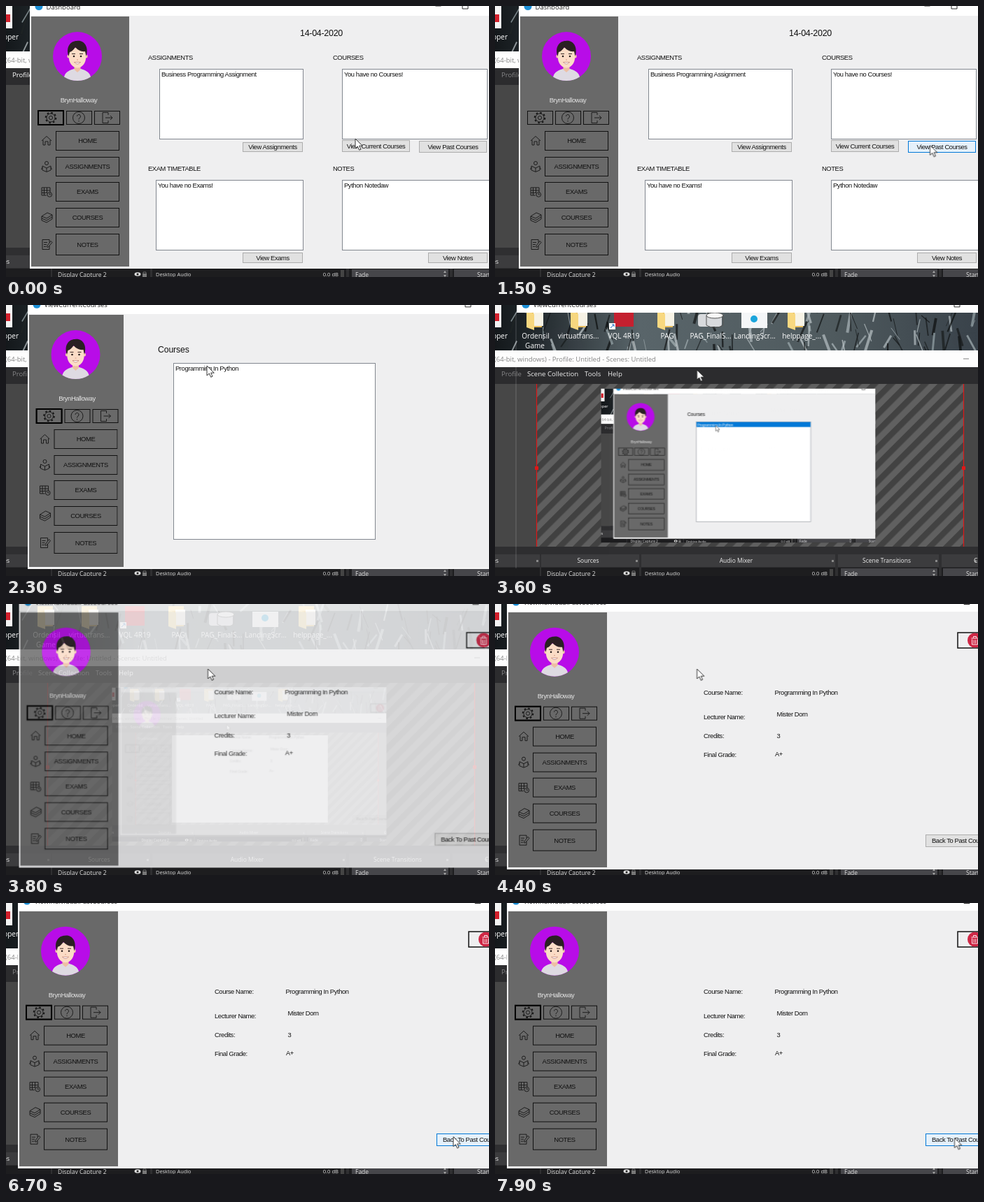
These frames come from a looping animation (690 by 388 pixels, 8000 ms). An HTML page:

```html
<!DOCTYPE html>
<html lang="en">
<head>
<meta charset="utf-8">
<title>Course planner</title>
<style>
  html, body { margin: 0; width: 100%; height: 100%; overflow: hidden; background: #2b2b2d; }
  svg { display: block; }
  text { font: 9.4px "Liberation Sans", Arial, sans-serif; letter-spacing: -.4px; fill: #111; }
  .os { font-family: "Open Sans", sans-serif; letter-spacing: 0; }
  .mid { text-anchor: middle; }
  .end { text-anchor: end; }
  .line { fill: none; stroke: #161616; stroke-width: .9; }
</style>
</head>
<body>
<svg id="stage" width="690" height="388" viewBox="0 0 690 388"></svg>
<script>
const LOOP = 8000;
const stage = document.getElementById('stage');

// ---- drawing helpers ----
const rect = (x, y, w, h, fill, extra = '') =>
  `<rect x="${x}" y="${y}" width="${w}" height="${h}" fill="${fill}" ${extra}/>`;
const text = (x, y, s, cls = '', style = '') =>
  `<text x="${x}" y="${y}" class="${cls}" style="${style}">${s}</text>`;
const os = (x, y, s, size, fill, cls = '') =>
  text(x, y, s, 'os ' + cls, `font-size:${size}px;fill:${fill}`);
const line = (d, extra = '') => `<path class="line" d="${d}" ${extra}/>`;
const group = (cls, body, extra = '') => `<g class="${cls}" ${extra}>${body}</g>`;
const box = (x, y, w, h, fill, stroke) =>
  rect(x + .5, y + .5, w - 1, h - 1, fill, `stroke="${stroke}"`);
const list = (x, y, w, h, item = '') =>
  box(x, y, w, h, '#fff', '#82878f') + text(x + 3, y + 11, item);
const label = (x, y, w, h, s) => text(x + w / 2, y + h / 2 + 3.4, s, 'mid');
const button = (x, y, w, h, s) => box(x, y, w, h, '#e1e1e1', '#adadad') + label(x, y, w, h, s);
const hover = (x, y, w, h, s) =>
  group('hover', box(x, y, w, h, '#e5f1fb', '#0078d7') + label(x, y, w, h, s));

let seed = 7;
const rnd = (min, max) => {
  seed = seed * 16807 % 2147483647;
  return (min + seed / 2147483647 * (max - min)).toFixed(1);
};

// ---- program windows ----
const avatar = `
  <circle r="35" fill="#b80ce8"/>
  <path d="M-19 29.4C-17 22-11 20-5 18H5C11 20 17 22 19 29.4A35 35 0 0 1-19 29.4Z" fill="#dedae2"/>
  <path d="M-4.500 12H4.500V19L0 23L-4.500 19Z" fill="#eebfa4"/>
  <circle cx="-12" cy="0" r="2.600" fill="#f3c8ae"/><circle cx="12" cy="0" r="2.600" fill="#f3c8ae"/>
  <path d="M-12-8Q0-17 12-8V4C11 12 5 16.500 0 16.500S-11 12-12 4Z" fill="#fbdcc6"/>
  <path d="M-12.500 0C-17-13-10-22-1-22C9-24 17-14 12.500 0L11-7Q3-6-3-13Q-7-7-11-6Z" fill="#2a2023"/>
  <path d="M-8-3.500h5M3-3.500h5" stroke="#3a2a28" fill="none"/>
  <circle cx="-5" cy="0" r="1.300" fill="#241a1a"/><circle cx="5" cy="0" r="1.300" fill="#241a1a"/>
  <path d="M-1 5h2" stroke="#d79f86"/><path d="M-4.500 8.500Q0 13.500 4.500 8.500Z" fill="#fff" stroke="#b4625a" stroke-width=".6"/>`;

const icons = [
  'M-7 0L0-6.5L7 0M-5-1V6H-2V1H2V6H5V-1',
  'M-2.5-5a2.5 2.5 0 1 0 5 0a2.5 2.5 0 1 0-5 0M-6-1L0 2L6-1V5L0 7.5L-6 5ZM0 2V7M-6 1L-7.5 4M6 1L7.5 4',
  'M-7-6H5V1M-7-6V5H0M-7-2H5M-7 1.5H1M-3.5-6V5M.5-6V2M1 4a3.3 3.3 0 1 0 6.6 0a3.3 3.3 0 1 0-6.6 0M4.3 2V4H6',
  'M-7-2L1-7L8-4L0 1ZM-7-2V1L0 4L8-1V-4M-7 1V4L0 7L8 2V-1',
  'M-6-7H4V-3M-6-7V7H4V2M-4-3H1M-4 0H0M-4 3H-1M0 3L6-5L8-3L2 4Z'
];
const rows = ['HOME', 'ASSIGNMENTS', 'EXAMS', 'COURSES', 'NOTES'];
const rowY = [179, 216, 252, 289, 326];

function sidebar(dx, dy) {
  const nav = rows.map((name, i) => {
    const h = i == 4 ? 31 : 28;
    return box(71, rowY[i], 91, h, 'none', '#111') + label(71, rowY[i], 91, h, name) +
      line(icons[i], `transform="translate(58 ${rowY[i] + h / 2})"`);
  }).join('');
  const tools = [46, 86, 126].map(x => box(x, 150, 37, 20, 'none', '#111')).join('') +
    group('focus', rect(46, 150, 36, 20, 'none', 'stroke="#000" stroke-width="2"')) +
    `<circle class="line" cx="64" cy="160" r="6"/><circle class="line" cx="64" cy="160" r="2.6"/>
     <circle class="line" cx="64" cy="160" r="7.3" stroke-dasharray="2.6 3.13" style="stroke-width:2"/>
     <circle class="line" cx="104" cy="160" r="8.5"/>` +
    line('M101.5 158a2.5 2.5 0 1 1 4 2Q104 161 104 162.5M104 164v1.5') +
    line('M146 156V152.5H138V167.5H146V164M142 160H152M149 157L152 160L149 163');
  return `<g transform="translate(${dx} ${dy})"><g transform="translate(102 72)">${avatar}</g>` +
    text(104, 138, 'BrynHalloway', 'mid', 'fill:#e6e6e6') + tools + nav + '</g>';
}

const titlebar = (x, h, dy, title, maxX) => rect(x, -10, 700, h + 10, '#fff') +
  `<circle cx="${x + 13}" cy="${dy - 4}" r="5.5" fill="#1c8fd6"/>` +
  os(x + 23.5, dy, title, 9.5, '#222') +
  line(`M${maxX - 42.5} ${dy - 4.5}h8M${maxX - 4} ${dy - 8.5}h8v8h-8z`);

const frame = (x, top, bottom, sideW, title) => title +
  rect(x, top, 700, bottom - top, '#f7f7f7') +
  rect(x + 2, top, 700, bottom - top - 2, '#efeff0') +
  rect(x + 2, top + 1, sideW, bottom - top - 4, '#696969');

const dash = frame(34, 14, 376, 140, titlebar(34, 14, 4.5, 'Dashboard', 656)) + sidebar(0, 0) +
  text(450.5, 43, '14-04-2020', 'mid', 'font-size:12.5px;letter-spacing:-.3px') +
  text(203, 77, 'ASSIGNMENTS') + text(467, 77, 'COURSES') +
  text(203, 236, 'EXAM TIMETABLE') + text(467, 236, 'NOTES') +
  list(219, 90, 206, 101, 'Business Programming Assignment') +
  list(480, 90, 208, 101, 'You have no Courses!') +
  list(214, 249, 211, 101, 'You have no Exams!') +
  list(480, 249, 212, 101, 'Python Notedaw') +
  button(338, 195, 86, 14, 'View Assignments') +
  button(480, 192, 97, 17, 'View Current Courses') +
  button(590, 193, 97, 17, 'View Past Courses') + hover(590, 193, 97, 17, 'View Past Courses') +
  button(338, 353, 86, 15, 'View Exams') + button(603, 353, 85, 15, 'View Notes');

const courses = frame(31, 13, 378, 135, titlebar(31, 13, 3.3, 'ViewCurrentCourses', 660)) +
  sidebar(-2.5, -1) +
  text(217, 68, 'Courses', '', 'font-size:12.2px;letter-spacing:-.1px') +
  list(239, 83, 289, 253, 'Programming In Python') +
  group('row', rect(240, 84, 287, 12.5, '#0078d7') +
    text(242, 94, 'Programming In Python', '', 'fill:#fff'));

const detail = frame(17, 11, 380, 141, titlebar(17, 11, 1, 'ViewIndividualPastCourses', 674)) +
  sidebar(-17, -3.3) +
  text(298, 130, 'Course Name:') + text(399.5, 130, 'Programming In Python') +
  text(298, 164.5, 'Lecturer Name:') + text(402.5, 161, 'Mister Dorn') +
  text(298, 192, 'Credits:') + text(402.5, 192, '3') +
  text(298, 219, 'Final Grade:') + text(400, 217.5, 'A+') +
  rect(661, 41, 50, 22, '#efeff0', 'stroke="#111" stroke-width="1.5"') +
  '<circle cx="685.5" cy="52" r="10.5" fill="#cf2745"/>' +
  '<path d="M680.5 49h10M683.5 48.5v-2h4v2M681.5 50.5v7.5h8v-7.5M684.2 51.5v5M686.800 51.5v5" fill="none" stroke="#fff" stroke-width=".9"/>' +
  button(615, 330, 102, 18, 'Back To Past Courses') + hover(615, 330, 102, 18, 'Back To Past Courses');

// ---- desktop and recorder behind the windows ----
function desktop() {
  let s = rect(0, 0, 690, 66, 'url(#forest)');
  for (let i = 0; i < 110; i++) {
    const x = rnd(30, 690), shade = i % 2 ? rnd(60, 78) : rnd(6, 14);
    s += `<path d="M${x} ${rnd(-5, 60)}l${rnd(-14, 14)} ${rnd(10, 32)}"
      stroke="hsl(195 9% ${shade}%)" stroke-width="${rnd(.8, 4)}" opacity=".75"/>`;
  }
  s += rect(-4, -4, 13, 36, '#f4f4f4') + rect(0, 12, 6, 11, '#d3202c');
  for (const x of [58, 121, 245, 431])
    s += rect(x - 13, 3, 22, 29, '#e8bd5c') + rect(x - 3, 8, 14, 22, '#f7f3e6') +
      `<path d="M${x - 13} 8L${x - 2} 13V36L${x - 13} 32Z" fill="#f8d880"/>`;
  s += rect(170, 3, 28, 28, '#c4202f') + rect(163, 26, 9, 9, '#fff') +
    '<path d="M165 33L170 28M167 28h3v3" stroke="#1668c0" fill="none"/>' +
    rect(290, 13, 34, 18, '#d8dadd', 'rx="4"') +
    '<ellipse cx="314" cy="15" rx="12" ry="4" fill="#f6f6f6" stroke="#555"/>' +
    '<path d="M302 15v14q12 7 24 0V15" fill="none" stroke="#555"/>' +
    rect(352, 11, 37, 22, '#f4f6f8') + '<circle cx="370" cy="20" r="5" fill="#1ba5dc"/>';
  [[58, 'Ordensil'], [119, 'virtuatrans...'], [184, 'VQL 4R19'], [246, 'PAG'],
   [308, 'PAG_FinalS...'], [371, 'LandingScr...'], [438, 'helppage_...']]
    .forEach(([x, n]) => s += os(x, 48, n, 10, '#fff', 'mid'));
  return s + os(57, 62, 'Game', 10, '#fff', 'mid') + os(18, 48, 'Developer', 10, '#fff', 'end');
}

function recorder() {
  let s = rect(0, 65, 690, 24, '#fdfdfd') +
    os(-1, 81, '(64-bit, windows) - Profile: Untitled - Scenes: Untitled', 9.5, '#858585') +
    line('M669 77h8', 'opacity=".6"') +
    rect(0, 89, 690, 24, '#2c2c2e') +
    os(9, 102, 'Profile', 9.6, '#858587') + group('bright', os(9, 102, 'Profile', 9.6, '#e4e4e4')) +
    os(46, 102, 'Scene Collection', 9.6, '#eee') + os(128, 102, 'Tools', 9.6, '#eee') +
    os(161, 102, 'Help', 9.6, '#eee') +
    rect(0, 113, 690, 233, '#474747') + rect(60, 113, 609, 233, 'url(#stripe)') +
    '<path d="M59.5 113V346M669.5 113V346" stroke="#e01818" stroke-width="1.2"/>' +
    rect(57, 231, 5, 5, '#e01818') + rect(667, 231, 5, 5, '#e01818') +
    rect(0, 346, 690, 42, '#2f2f31');
  for (const [x, w] of [[0, 64], [66, 140], [209, 277], [490, 144], [638, 52]])
    s += rect(x, 357, w, 18, '#3c3c3e') + rect(x + w - 5, 365, 3, 3, '#888') +
      rect(x, 376, w, 12, '#1d1d1f');
  return s + os(5, 369, 'Scenes', 8.5, '#eee', 'end') + os(133, 369, 'Sources', 8.5, '#eee', 'mid') +
    os(344.5, 369, 'Audio Mixer', 8.5, '#eee', 'mid') +
    os(559.5, 369, 'Scene Transitions', 8.5, '#eee', 'mid') + os(684, 369, 'Controls', 8.5, '#eee') +
    os(74, 387.5, 'Display Capture 2', 8.5, '#ddd') +
    '<ellipse cx="188" cy="384" rx="4.5" ry="2.8" fill="#ddd"/><circle cx="188" cy="384" r="1.5" fill="#222"/>' +
    rect(195, 383, 6, 5, '#777') + line('M196 383v-2h4v2', 'style="stroke:#777"') +
    os(214, 387, 'Desktop Audio', 7.4, '#ddd') + os(475, 387, '0.0 dB', 7.6, '#ddd', 'end') +
    rect(478, 378, 5, 10, '#444') + rect(494, 377, 138, 11, '#46464a') + rect(640, 377, 50, 11, '#46464a') +
    os(499, 387.5, 'Fade', 8.5, '#ddd') + os(673, 387.5, 'Start', 8.5, '#ddd') +
    '<path d="M625 382l2-3 2 3zM625 385l2 3 2-3z" fill="#aaa"/>';
}

const pointer = group('cursor',
  '<path d="M0 0V14L3.3 11L5.7 16.3L8 15.2L5.7 10.2H10.3Z" fill="#fff" stroke="#222" stroke-width=".9"/>');
const back = desktop() + recorder();
const windows = group('dash', dash) + group('closing', group('courses', courses)) + group('detail', detail);
const nested = rect(151, 120, 392, 220, '#efeff0');

stage.innerHTML = `<defs>
    <linearGradient id="forest">
      <stop offset="0" stop-color="#14181b"/><stop offset=".08" stop-color="#22292d"/>
      <stop offset=".3" stop-color="#59656a"/><stop offset=".7" stop-color="#4f5a5e"/>
      <stop offset="1" stop-color="#39424a"/></linearGradient>
    <pattern id="stripe" width="17" height="17" patternUnits="userSpaceOnUse" patternTransform="rotate(45)">
      ${rect(0, 0, 17, 17, '#606060')}${rect(0, 0, 8.5, 17, '#424242')}</pattern>
    <clipPath id="view">${rect(0, 0, 690, 388, '#000')}</clipPath></defs>` +
  back +
  group('mini', group('', back + nested + windows + pointer, 'clip-path="url(#view)"'),
    'transform="translate(151.4 119.8) scale(.568)"') +
  group('ghost1', titlebar(34, 11, 4.5, 'Dashboard', 656), 'opacity="0"') +
  group('ghost2', titlebar(31, 11, 3.3, 'ViewCurrentCourses', 660) +
    rect(29, 11, 2, 366, '#fff', 'opacity=".1"'), 'opacity="0"') +
  group('main', windows) + pointer;

// ---- motion ----
const HOLD = 'steps(1, end)';
function run(sel, prop, steps, easing = HOLD) {
  const all = [...steps, [LOOP, steps[steps.length - 1][1]]];
  const frames = all.map(([ms, v]) => ({ offset: ms / LOOP, [prop]: v, easing }));
  stage.querySelectorAll(sel).forEach(el => el.animate(frames, { duration: LOOP, iterations: Infinity }));
}
const zoom = k => `translate(${220 * (1 - k)}px, ${20 * (1 - k)}px) scale(${k})`;
const opens = (sel, at) => {
  run(sel, 'opacity', [[0, 0], [at, 0], [at + 100, .45], [at + 200, .84], [at + 300, 1]], 'linear');
  run(sel, 'transform', [[0, zoom(.95)], [at, zoom(.95)], [at + 200, zoom(.993)], [at + 300, zoom(1)]], 'linear');
};
const shown = (sel, from, to) =>
  run(sel, 'opacity', from ? [[0, 0], [from, 1], [to, 0]] : [[0, 1], [to, 0]]);

// main windows
shown('.main .dash', 0, 1600);
shown('.main .closing', 0, 3600);
opens('.main .courses', 1600);
opens('.main .detail', 3600);
shown('.ghost1', 1600, 1700);
shown('.ghost2', 3600, 3700);

// preview of the screen, a moment late
shown('.mini .dash', 0, 1700);
shown('.mini .courses', 1700, 3700);
opens('.mini .detail', 3680);

// states
run('.bright', 'opacity', [[0, 1], [500, 0]]);
shown('.dash .focus', 0, 1300);
shown('.courses .focus', 0, 2900);
run('.dash .hover', 'opacity', [[0, 0], [700, 1]]);
run('.courses .row', 'opacity', [[0, 0], [2900, 1]]);
run('.detail .hover', 'opacity', [[0, 0], [6600, 1]]);

run('.cursor', 'transform', [
  [0, 499, 190], [100, 499, 190], [850, 620, 199], [1000, 621.5, 199.5], [1900, 621.5, 199.5],
  [2280, 287, 87], [3100, 287, 87], [3350, 288.5, 93], [4400, 288.5, 93], [5300, 459.5, 211],
  [6100, 459.5, 211], [6750, 641, 336], [7200, 641, 336], [7400, 653, 336.5], [7500, 653, 336.5],
  [7600, 656.5, 336.5]
].map(([ms, x, y]) => [ms, `translate(${x}px, ${y}px)`]), 'ease-in-out');
</script>
</body>
</html>
```
